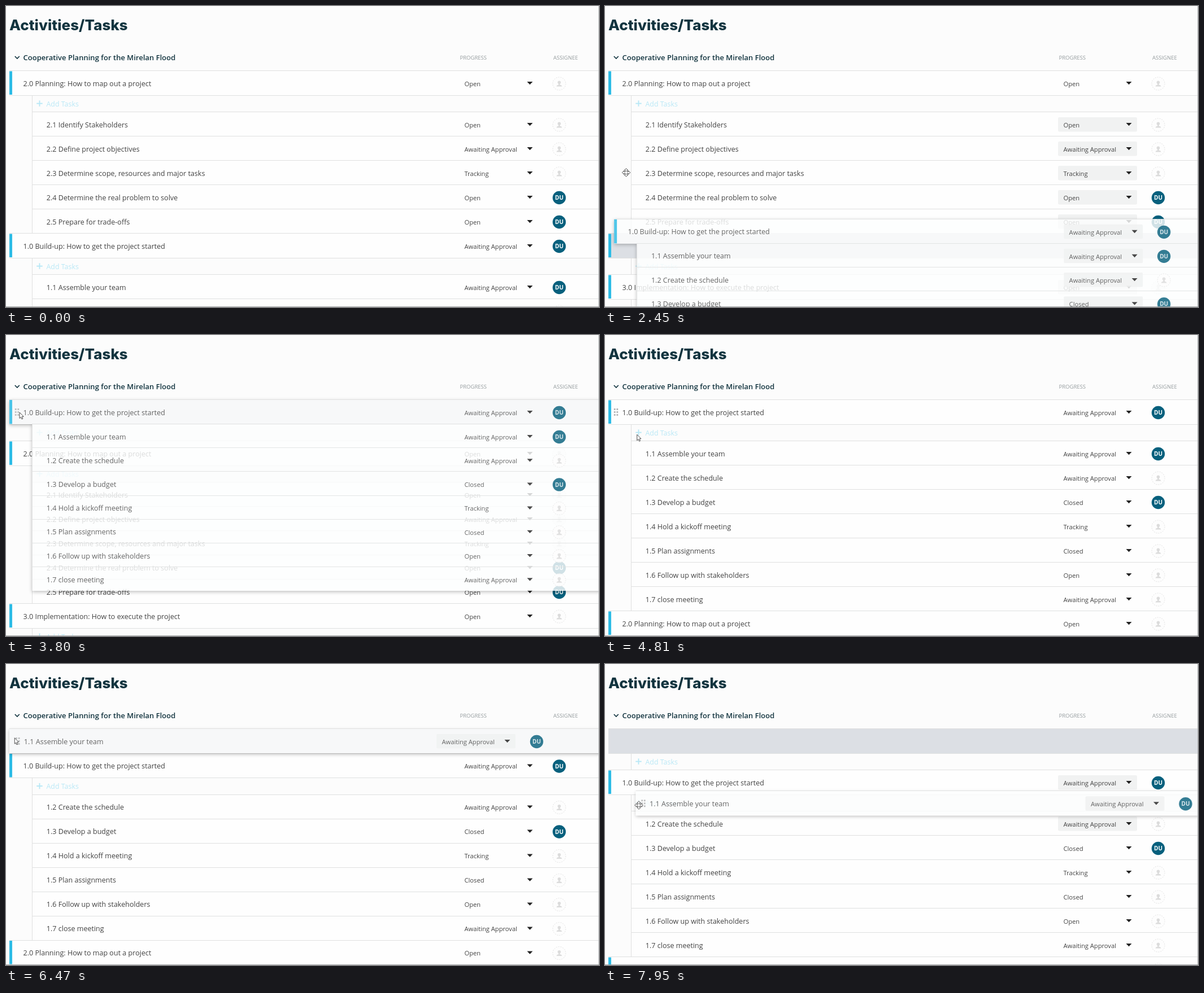
Animation of 1051x533 px, one loop 8 s. Source, as an HTML page with a canvas:

```html
<!DOCTYPE html>
<html lang="en">
<head>
<meta charset="utf-8">
<title>Activities/Tasks</title>
<style>
html, body { margin: 0; width: 100%; height: 100%; overflow: hidden; background: #fcfcfc; }
canvas { display: block; }
</style>
</head>
<body>
<canvas id="stage" width="1051" height="533"></canvas>
<script>
const W = 1051, H = 533, LOOP = 8000;
const TOP = 114.5, MAIN = 43.5, ADD = 29.5, SUB = 43, CARD_SUB = 42.2;
const MAIN_LEFT = 6, SUB_LEFT = 46;
const c = document.getElementById('stage').getContext('2d');
const SANS = '"Open Sans", "Noto Sans", sans-serif';
const INK = '#12343f', LINE = '#dfe0e0', BLUE = '#2dbce6', PALE = '#b9e8f6', GHOST = '#dcdfe4';

const WAIT = 'Awaiting Approval';
const task = (name, status = 'Open', owned = false) => ({ name, status, owned });
const group = (head, rows = [], bar = true, add = true) => ({ head, rows, bar, add });

const planning = group(task('2.0 Planning: How to map out a project'), [
  task('2.1 Identify Stakeholders'),
  task('2.2 Define project objectives', WAIT),
  task('2.3 Determine scope, resources and major tasks', 'Tracking'),
  task('2.4 Determine the real problem to solve', 'Open', true),
  task('2.5 Prepare for trade-offs', 'Open', true)
]);
const team = task('1.1 Assemble your team', WAIT, true);
const build = group(task('1.0 Build-up: How to get the project started', WAIT, true), [
  team,
  task('1.2 Create the schedule', WAIT),
  task('1.3 Develop a budget', 'Closed', true),
  task('1.4 Hold a kickoff meeting', 'Tracking'),
  task('1.5 Plan assignments', 'Closed'),
  task('1.6 Follow up with stakeholders'),
  task('1.7 close meeting', WAIT)
]);
const buildRest = group(build.head, build.rows.slice(1));
const execution = group(task('3.0 Implementation: How to execute the project'));
const ghost = (bar, add) => group(null, [], bar, add);

const clamp = p => Math.max(0, Math.min(1, p));
const mix = (a, b, k) => a + (b - a) * k;
const easeOut = p => 1 - (1 - p) ** 1.45;
const easeInOut = p => p < 0.5 ? (2 * p) ** 5 / 2 : 1 - (2 - 2 * p) ** 5 / 2;

// Moves from one point to another, bowing sideways on the way.
function glide([x0, y0], [x1, y1], p, ease, bow = 0) {
  const k = ease(p);
  return [mix(x0, x1, k) + bow * Math.sin(Math.PI * p), mix(y0, y1, k)];
}

const drags = [
  { group: build, head: build.head, rows: build.rows, left: MAIN_LEFT, top: 402.5,
    start: 2200, end: 2900, drop: 3040, done: 3850, to: [2, -265.2], bow: 11 },
  { head: team, rows: [], left: SUB_LEFT, top: 187.5,
    start: 5480, end: 5780, drop: 6070, done: 6800, to: [-36, -78.8], bow: 0 },
  { head: team, rows: [], left: MAIN_LEFT, top: TOP,
    start: 7350, end: 7950, drop: LOOP, done: LOOP, to: [48.5, 110.3], bow: 31 }
];
const [raise, promote, demote] = drags;

const moves = [
  { start: 810, end: 1390, to: [20, 425] },
  { start: raise.start, end: 2940, to: [24, 137], bow: 18 },
  { start: 4560, end: 5140, to: [58, 207], bow: 14 },
  { start: promote.start, end: promote.end, to: [20, 129] },
  { start: promote.drop, end: 6940, to: [12, 132] },
  { start: demote.start, end: demote.end, to: [60, 250], bow: 65, ease: easeInOut }
];

const progress = (span, t) => clamp((t - span.start) / (span.end - span.start));

function cursorAt(t) {
  let at = [70, 550];
  for (const m of moves) at = glide(at, m.to, progress(m, t), t < m.start ? () => 0 : m.ease || easeOut, m.bow);
  return at;
}

function cardOffset(d, t) {
  if (t < d.drop) return glide([0, 0], d.to, progress(d, t), easeInOut, d.bow);
  return glide(d.to, [MAIN_LEFT - d.left, TOP - d.top], clamp((t - d.drop) / 100), easeOut);
}

function groupsAt(t) {
  if (t < raise.start) return [planning, build];
  if (t < 2700) return [planning, ghost(true, true), execution];
  if (t < raise.done) return [ghost(true, true), planning, execution];
  if (t < promote.start) return [build, planning];
  if (t < promote.start + 90) return [group(build.head, [null, ...buildRest.rows]), planning];
  if (t < promote.done) return [ghost(false, false), buildRest, planning];
  if (t < demote.start) return [group(team, [], false), buildRest, planning];
  return [ghost(false, true), buildRest, planning];
}

function rect(x, y, w, h, color) {
  c.fillStyle = color;
  c.fillRect(x, y, w, h);
}

const rule = (x, y) => rect(x, Math.round(y - 0.5), W - x, 1, LINE);

function text(s, x, y, size, color = '#444', weight = 400, family = SANS) {
  c.font = `${weight} ${size}px ${family}`;
  c.fillStyle = color;
  c.fillText(s, x, y);
}

function polygon(points) {
  c.beginPath();
  points.forEach(([x, y]) => c.lineTo(x, y));
  c.closePath();
}

function disc(x, y, r, color) {
  c.beginPath();
  c.arc(x, y, r, 0, 7);
  c.fillStyle = color;
  c.fill();
}

function assignee(owned, x, y) {
  if (owned) {
    disc(x, y, 11.7, '#07607d');
    c.textAlign = 'center';
    text('DU', x, y + 3.6, 10, '#fff', 700);
    c.textAlign = 'left';
    return;
  }
  disc(x, y, 11.5, '#fdfdfd');
  c.strokeStyle = '#e2e2e2';
  c.lineWidth = 1;
  c.setLineDash([2, 2]);
  c.stroke();
  c.setLineDash([]);
  disc(x, y - 2.2, 2.8, '#dcdcdc');
  rect(x - 1.3, y, 2.6, 3, '#dcdcdc');
  c.beginPath();
  c.ellipse(x, y + 5, 4.8, 3, 0, Math.PI, 0);
  c.fill();
}

function shade(dx, top) {
  c.fillStyle = '#f1f2f2';
  c.beginPath();
  c.roundRect(803 + dx, top + 9.5, 140, 25.5, 2);
  c.fill();
}

function grip(x, y) {
  for (const i of [-2.3, 2.3])
    for (const j of [-5, 0, 5]) rect(x + i - 1.4, y + j - 1.4, 2.8, 2.8, '#b0b2b4');
}

function rowContent(item, left, top, { dx = 0, shaded, gripped }) {
  const x = (left === MAIN_LEFT ? 30.5 : 71.8) + dx;
  if (shaded) shade(dx, top);
  if (gripped) grip(x - 11, top + 22);
  text(item.name, x, top + 27, 12.55);
  text(item.status, 812.5 + dx, top + 27.2, 11.15);
  c.fillStyle = '#222';
  polygon([[923.5 + dx, top + 19.5], [933.5 + dx, top + 19.5], [928.5 + dx, top + 24.8]]);
  c.fill();
  assignee(item.owned, 980.5 + dx, top + 23);
}

function listRow(item, left, top, height, look) {
  rect(left, top, W - left, height, item ? '#fefefe' : GHOST);
  rule(left, top);
  rule(left, top + height);
  if (item) rowContent(item, left, top, look);
}

function addTasks(y) {
  rect(54.3, y + 13.6, 10.4, 2, PALE);
  rect(58.5, y + 9.4, 2, 10.4, PALE);
  text('Add Tasks', 71.5, y + 19.8, 12.4, PALE);
}

function drawList(groups, hoverY, isShaded) {
  const look = (top, reach) => ({ shaded: isShaded(top), gripped: hoverY >= top && hoverY < top + reach });
  let y = TOP;
  for (const g of groups) {
    listRow(g.head, MAIN_LEFT, y, MAIN, look(y, MAIN + ADD));
    if (g.bar) rect(MAIN_LEFT, y + 1, 5, MAIN - 2, BLUE);
    y += MAIN;
    const bodyTop = y;
    if (g.add) {
      addTasks(y);
      y += ADD;
    }
    for (const r of g.rows) {
      listRow(r, SUB_LEFT, y, SUB, look(y, SUB));
      y += SUB;
    }
    rect(SUB_LEFT, bodyTop, 1, y - bodyTop, LINE);
  }
}

function drawCard(d, [dx, dy], p) {
  const left = d.left + dx, subLeft = SUB_LEFT + dx, top = d.top + dy;
  const bodyHeight = d.rows.length * CARD_SUB;
  const shape = new Path2D();
  shape.rect(left, top, W, 43.5);
  if (bodyHeight) shape.rect(subLeft, top + 43.5, W, bodyHeight - 0.5);

  // The shadow falls only outside the translucent card.
  const outside = new Path2D(shape);
  outside.rect(-W, -H, 4 * W, 4 * H);
  c.save();
  c.clip(outside, 'evenodd');
  c.shadowColor = 'rgba(0,0,0,.25)';
  c.shadowBlur = 6;
  c.shadowOffsetY = 2;
  c.fillStyle = '#fff';
  c.fill(shape);
  c.restore();

  c.save();
  c.globalAlpha = 0.82;
  c.fillStyle = '#fdfefe';
  c.fill(shape);
  rule(left, top);
  if (d.group) rect(left, top + 0.5, 5, 42.5, BLUE);
  const shaded = !d.group || p < 0.5;
  rowContent(d.head, d.left, top, { dx, shaded, gripped: !d.group || p > 0.5 });
  d.rows.forEach((r, i) => {
    const y = top + 43 + i * CARD_SUB;
    rule(subLeft, y);
    rowContent(r, SUB_LEFT, y, { dx, shaded });
  });
  rect(subLeft, top + 43, 1, bodyHeight, LINE);
  c.restore();
}

function drawCursor([x, y], moving) {
  const points = [];
  if (moving) {
    const arm = [[-1.4, -1.4], [-1.4, -4], [-3.2, -4], [0, -7.3], [3.2, -4], [1.4, -4]];
    for (let q = 0; q < 4; q++) {
      const cos = Math.cos(q * Math.PI / 2), sin = Math.sin(q * Math.PI / 2);
      for (const [a, b] of arm) points.push([x + a * cos - b * sin, y + a * sin + b * cos]);
    }
  } else {
    const arrow = [[0, 0], [0, 10.5], [2.4, 8.4], [4, 12], [5.8, 11.2], [4.2, 7.7], [7.2, 7.4]];
    for (const [a, b] of arrow) points.push([x + a, y + b]);
  }
  polygon(points);
  c.fillStyle = '#fff';
  c.strokeStyle = '#3a3a3a';
  c.lineWidth = 0.9;
  c.fill();
  c.stroke();
}

function drawHeader() {
  text('Activities/Tasks', 6, 42.5, 26, INK, 800, 'Inter, sans-serif');
  c.strokeStyle = INK;
  c.lineWidth = 1.7;
  c.beginPath();
  c.moveTo(15.8, 89);
  c.lineTo(19.8, 93);
  c.lineTo(23.8, 89);
  c.stroke();
  text('Cooperative Planning for the Mirelan Flood', 30.5, 96, 13.05, INK, 600);
  text('PROGRESS', 804.5, 95, 9.5, '#959c9e');
  text('ASSIGNEE', 970, 95, 9.5, '#959c9e');
}

function draw(t) {
  const cursor = cursorAt(t);
  const drag = drags.find(d => t >= d.start && t < d.done);
  const held = drag && t < drag.drop;
  const offset = drag && cardOffset(drag, t);
  const p = drag && progress(drag, t);
  // Early in a drag every lower row is shaded, later only those beside the card.
  const isShaded = top => held && top > TOP &&
    (p < 0.5 || Math.abs(top - drag.top - offset[1]) < 50);

  rect(0, 0, W, H, '#fcfcfc');
  drawHeader();
  drawList(groupsAt(t), drag ? -1 : cursor[1], isShaded);
  if (drag) drawCard(drag, offset, p);
  drawCursor(cursor, held);
  rect(W - 1, 0, 1, H, '#b9bbbc');
  rect(0, H - 1, W, 1, '#a3a5a6');
}

function tick() {
  draw(performance.now() % LOOP);
  requestAnimationFrame(tick);
}
tick();
</script>
</body>
</html>
```
